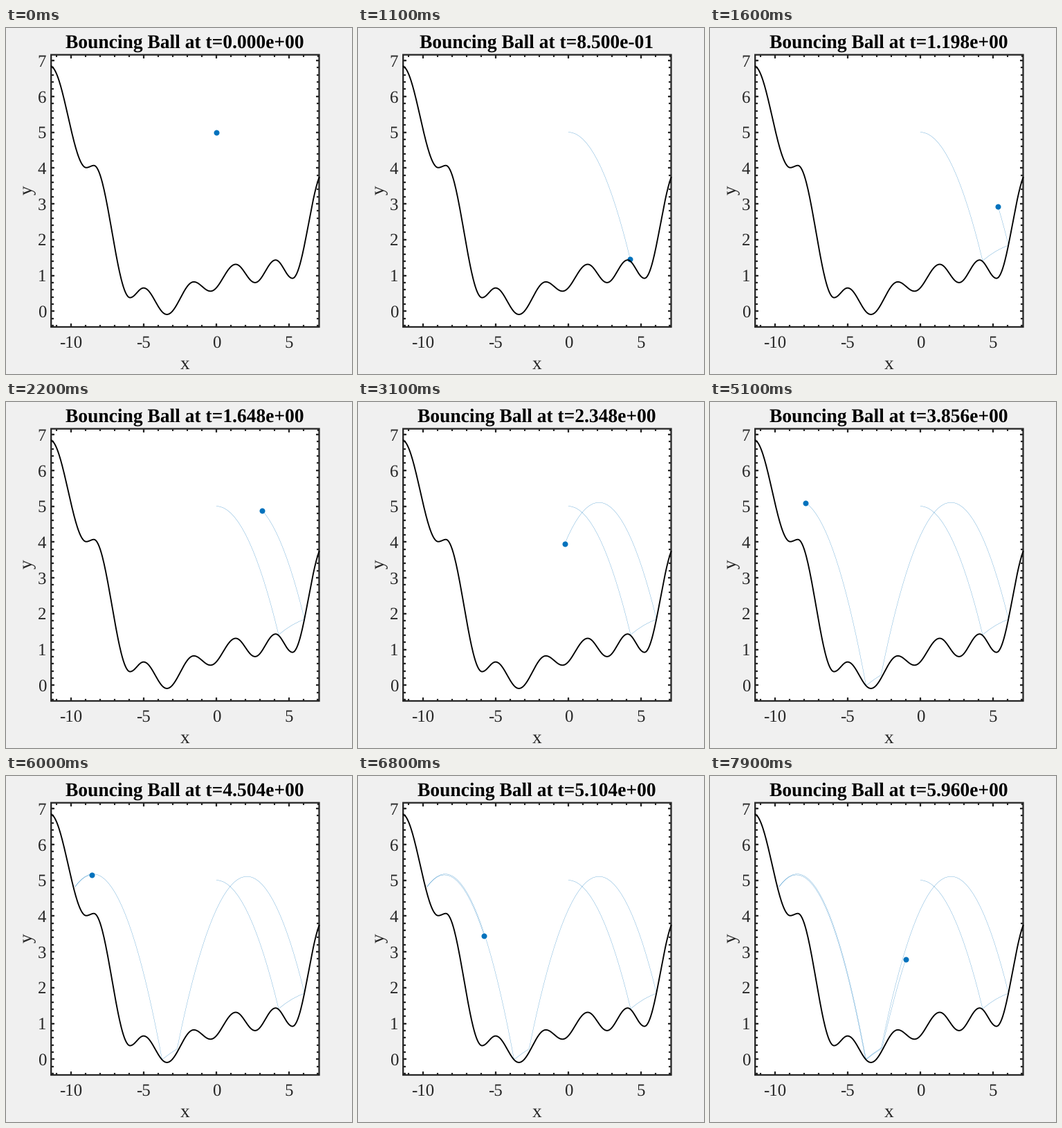
A matplotlib script for the animation above (8000 ms loop, 500 by 500 pixels).

```python
import numpy as np
import matplotlib.pyplot as plt
from matplotlib.animation import FuncAnimation

plt.rcParams["font.family"] = "Liberation Serif"
plt.rcParams["text.hinting"] = "none"

FRAMES, INTERVAL = 80, 100
PX = 0.72                      # points per pixel at 100 dpi
G, DT = 9.81, 0.05             # gravity, solver step
PACE = 0.0753                  # simulated seconds per frame
DARK, BLUE = "#262626", "#0072BD"
LEFT, RIGHT, TOP, BOTTOM = 65.2, 452.5, 38.7, 432

# Launch, bounces and end of the last arc: time, x, y
BOUNCES = [
    (0, 0, 5), (0.8555, 4.278, 1.41), (1.048, 6.06, 1.84),
    (2.855, -2.70, 0.287), (2.956, -3.73, -0.01), (4.254, -9.71, 4.815),
    (5.54, -3.765, -0.01), (5.66, -2.62, 0.33), (6.01, -0.73, 3.12),
]

# Crests and valleys of the ground: x, y
CRESTS = [
    (-11.43, 6.85), (-8.94, 4.01), (-8.42, 4.07), (-5.93, 0.38),
    (-5, 0.65), (-3.4, -0.09), (-1.55, 0.82), (-0.4, 0.56), (1.33, 1.31),
    (2.66, 0.8), (4.07, 1.43), (5.23, 0.92), (7.42, 3.93),
]


def to_px(x, y):
    return 304 + 21.03 * np.asarray(x), 409.3 - 51.75 * np.asarray(y)


def ground_height(x):
    """Cosine ease from each crest to the next valley and back."""
    cx, cy = np.array(CRESTS).T
    i = np.searchsorted(cx, x) - 1
    u = (x - cx[i]) / (cx[i + 1] - cx[i])
    return cy[i] + (cy[i + 1] - cy[i]) * (1 - np.cos(np.pi * u)) / 2


def flight():
    """Sample every ballistic arc, restarting the clock at each bounce."""
    parts = []
    for (t0, x0, y0), (t1, x1, y1) in zip(BOUNCES, BOUNCES[1:]):
        t = np.arange(t0, t1, DT)
        s = (t - t0) / (t1 - t0)
        y = y0 + (y1 - y0) * s + G / 2 * (t - t0) * (t1 - t)
        parts.append((t, x0 + (x1 - x0) * s, y))
    return np.hstack(parts)


fig = plt.figure(figsize=(5, 5), dpi=100, facecolor="#f0f0f0")
ax = fig.add_axes([0, 0, 1, 1])
ax.set(xlim=(0, 500), ylim=(500, 0))
ax.axis("off")
ax.add_patch(plt.Rectangle((LEFT, TOP), RIGHT - LEFT, BOTTOM - TOP, snap=False,
                           fc="white", ec=DARK, lw=2.3 * PX, zorder=1))


def label(x, y, s, size=24.9, color=DARK, **kw):
    return ax.text(x, y, s, fontsize=size * PX, color=color,
                   va="baseline", **kw)


def x_ticks(values, size):
    px, _ = to_px(values, 0)
    for a, b in (TOP, TOP + size), (BOTTOM - size, BOTTOM):
        ax.vlines(px, a, b, color=DARK, lw=2.2 * PX)


def y_ticks(values, size):
    _, px = to_px(0, values)
    for a, b in (LEFT, LEFT + size), (RIGHT - size, RIGHT):
        ax.hlines(px, a, b, color=DARK, lw=2.2 * PX)


x_ticks(np.arange(-11, 8), 3.3)
y_ticks(np.arange(-2, 36) / 5, 3.3)
x_ticks(np.arange(-10, 6, 5), 5)
y_ticks(np.arange(8), 5)
for v in range(-10, 6, 5):
    label(to_px(v, 0)[0], 461.5, str(v), ha="center")
for v in range(8):
    label(58, to_px(0, v)[1] + 8.5, str(v), ha="right")
label(258.5, 493.3, "x", 27.4, ha="center")
label(37.5, 234, "y", 27.4, ha="center", rotation=90, rotation_mode="anchor")
title = label(258.5, 29, "", 27.5, color="black", ha="center", weight="bold")

gx = np.linspace(-11.33, 7.06, 500)
trace, = ax.plot([], [], color=BLUE, lw=0.25 * PX, zorder=3)
ball, = ax.plot([], [], "o", color=BLUE, mew=0, ms=8 * PX, zorder=4)
ax.plot(*to_px(gx, ground_height(gx)), color="black", lw=1.9 * PX, zorder=5)

T, X, Y = flight()
X, Y = to_px(X, Y)


def draw(frame):
    k = np.argmin(abs(T - PACE * frame))
    ball.set_data([X[k]], [Y[k]])
    trace.set_data(X[:k + 1], Y[:k + 1])
    title.set_text(f"Bouncing Ball at t={T[k]:.3e}")
    return trace, ball, title


anim = FuncAnimation(fig, draw, frames=FRAMES, interval=INTERVAL,
                     repeat=True, repeat_delay=0)
plt.show()
```
